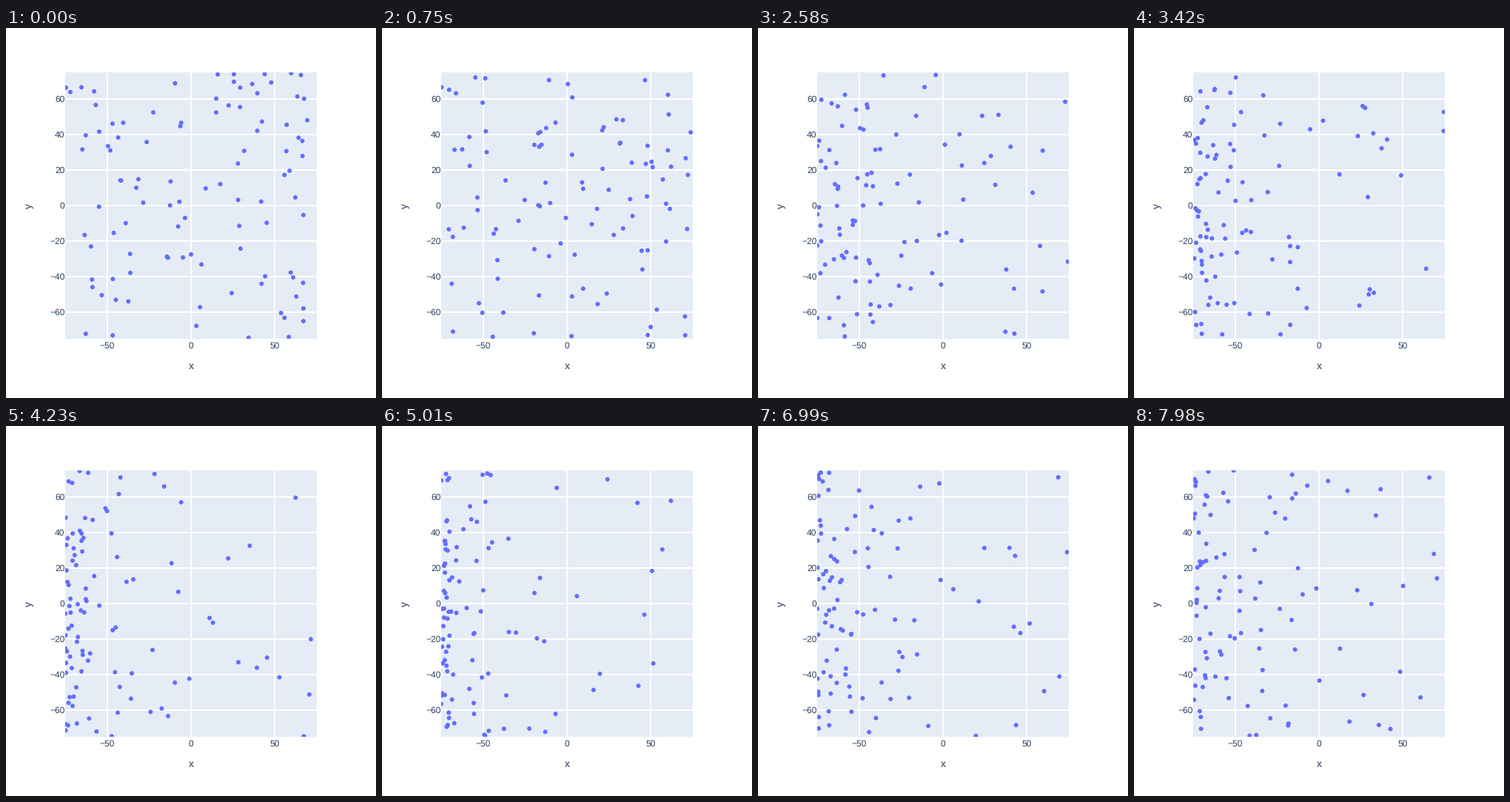
Recreate the animation shown at these times as a matplotlib script. Size 500 px wide and 500 px high, loop 8000 ms.

```python
import numpy as np
import matplotlib.pyplot as plt
from matplotlib.animation import FuncAnimation
from matplotlib.patches import Rectangle

plt.rcParams["font.family"] = "Liberation Sans"
plt.rcParams["text.hinting"] = "none"

SIZE, DPI = 500, 100
LOOP_MS, STEP_MS, TICK_MS = 8000, 30, 20
STEPS = LOOP_MS // STEP_MS + 1
COUNT = 100
LEFT, RIGHT, TOP, BOTTOM = 80, 420, 60, 420
INK, PANEL, DOT = "#2a3f5f", "#e5ecf6", "#636efa"


def pt(px):
    return px * 72 / DPI


def sx(v):
    return 250 + v * (RIGHT - LEFT) / 150


def sy(v):
    return 240 - v * (BOTTOM - TOP) / 150


def reflect(v, lo, hi):
    return np.where(v < lo, 2 * lo - v, np.where(v > hi, 2 * hi - v, v))


def simulate():
    """Wanderers whose speed grows with distance from the left wall."""
    rng = np.random.default_rng(12)
    x = rng.uniform(LEFT, RIGHT, COUNT)
    y = rng.uniform(TOP, BOTTOM, COUNT)
    angle = rng.uniform(0, 2 * np.pi, COUNT)
    path = []
    for _ in range(STEPS):
        path.append(np.column_stack([x, y]))
        angle += rng.normal(0, 0.1, COUNT)
        speed = 0.028 * (x - LEFT + 10)
        x = x + speed * np.cos(angle)
        y = y + speed * np.sin(angle)
        angle = np.where((x < LEFT) | (x > RIGHT), np.pi - angle, angle)
        angle = np.where((y < TOP) | (y > BOTTOM), -angle, angle)
        x = reflect(x, LEFT, RIGHT)
        y = reflect(y, TOP, BOTTOM)
    return np.array(path)


fig = plt.figure(figsize=(SIZE / DPI, SIZE / DPI), dpi=DPI, facecolor="white")
ax = fig.add_axes([0, 0, 1, 1])
ax.set_xlim(0, SIZE)
ax.set_ylim(SIZE, 0)
ax.axis("off")

panel = Rectangle((LEFT, TOP), RIGHT - LEFT, BOTTOM - TOP, fc=PANEL, lw=0, zorder=0)
ax.add_patch(panel)


def label(x, y, text, px=12, **kw):
    ax.text(x, y, text, fontsize=pt(px), color=INK, zorder=4, **kw)


def grid(xs, ys):
    ax.plot(xs, ys, color="white", lw=pt(2), zorder=1, solid_capstyle="butt")


def number(v):
    return str(v).replace("-", "\u2212")


for v in (-50, 0, 50):
    grid([sx(v)] * 2, [TOP, BOTTOM])
    label(sx(v), 433, number(v), ha="center", va="baseline")
for v in range(-60, 61, 20):
    grid([LEFT, RIGHT], [sy(v)] * 2)
    label(79.5, sy(v) + 4.2, number(v), ha="right", va="baseline")

label(250, 461, "x", px=14, ha="center", va="baseline")
label(31, 240, "y", px=14, ha="center", va="center", rotation=90)

path = simulate()
# One size per dot keeps them at sub-pixel places.
dots = ax.scatter(path[0, :, 0], path[0, :, 1], s=np.full(COUNT, pt(6) ** 2),
                  c=DOT, linewidths=0, zorder=3)
dots.set_clip_path(panel)


def update(i):
    dots.set_offsets(path[i * TICK_MS // STEP_MS])
    return (dots,)


anim = FuncAnimation(fig, update, frames=LOOP_MS // TICK_MS, interval=TICK_MS,
                     repeat=True, repeat_delay=0)
plt.show()
```
